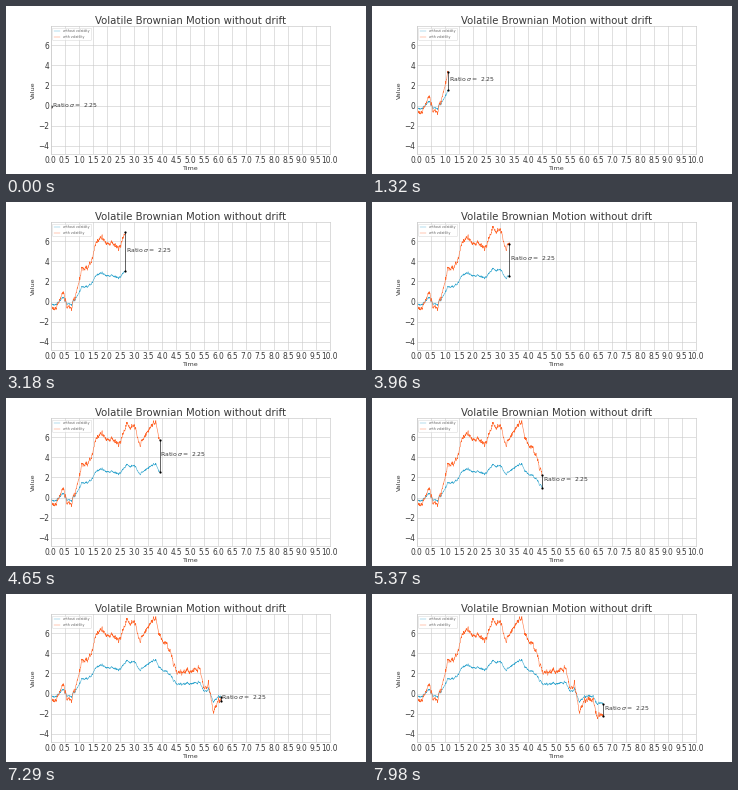
These frames come from a looping animation (360x168 px, 8000 ms). A matplotlib script:

```python
import numpy as np
import matplotlib.pyplot as plt
from matplotlib.animation import FuncAnimation

FRAMES, LOOP_MS = 267, 8000
DT = 0.025          # time covered by one frame
SUB = 4             # path points per frame
SIGMA = 2.25
INK, SOFT, PALE = "#3a3a3a", "#666666", "#cccccc"
BLUE, ORANGE = "#2fa4cd", "#ff6428"

# Turning points of the volatile path: (time, value)
TURNS = [
    (0, -0.2), (0.1, -0.8), (0.2, -0.5), (0.45, 0.9), (0.6, -0.5),
    (0.75, -0.8), (0.9, 0.7), (1.12, 3.2), (1.4, 3.5), (1.65, 5.8),
    (1.8, 6.3), (2.1, 5.7), (2.5, 5.7), (2.75, 7.5), (3.05, 6.8),
    (3.2, 5), (3.4, 6.4), (3.75, 7.5), (3.9, 5.8), (4.25, 4.5),
    (4.5, 2.1), (5.35, 2.4), (5.5, 0.6), (5.65, 1.1),
    (5.83, -1.9), (6, -0.7), (6.3, -0.5), (6.45, -2), (6.7, -2.3),
]


def make_path(times):
    """Trend through the turning points plus mean-reverting noise."""
    rng = np.random.default_rng(4)
    trend = np.interp(times, *zip(*TURNS)) / SIGMA
    noise = np.zeros(len(times))
    for i in range(1, len(times)):
        noise[i] = 0.8 * noise[i - 1] + rng.normal(0, 0.045)
    return np.clip(trend + noise, -2.1, 3.5)


times = np.arange(FRAMES * SUB + 1) * DT / SUB
plain = make_path(times)

plt.rcParams["font.family"] = "DejaVu Sans"
fig = plt.figure(figsize=(5, 7 / 3), dpi=72, facecolor="white")
ax = fig.add_axes([0.12425, 0.12, 0.775, 0.76])
ax.set(xlim=(0, 10), ylim=(-4.805, 7.9))
ax.set_xticks(np.arange(0, 10.1, 0.5))
ax.xaxis.set_major_formatter("{x:.1f}")
ax.set_yticks(range(-4, 7, 2))
ax.tick_params(length=0, pad=1.75, labelsize=7.5, labelcolor=INK)
ax.set_axisbelow(True)
ax.grid(color=PALE, lw=0.6)
for spine in ax.spines.values():
    spine.set(color=PALE, linewidth=0.7)
ax.set_title("Volatile Brownian Motion without drift",
             fontsize=10.07, color=INK, pad=2.6)
ax.set_xlabel("Time", fontsize=6.4, color=INK, labelpad=1.6)
ax.set_ylabel("Value", fontsize=6.4, color=INK, labelpad=1.6)

low_line, = ax.plot([], [], color=BLUE, lw=0.5, label="without volatility")
high_line, = ax.plot([], [], color=ORANGE, lw=0.5, label="with volatility")
gap, = ax.plot([], [], "o-", color="black", lw=0.6, ms=2.2, mew=0)
note = ax.text(0, 0, rf"Ratio $\sigma = $ {SIGMA}", fontsize=6.15, color=INK)
legend = ax.legend(loc="upper left", fontsize=3.3, labelcolor=SOFT,
                   edgecolor=PALE)
legend.get_frame().set_linewidth(0.5)
plt.setp(legend.get_lines(), linewidth=0.35)


def draw(i):
    end = (i + 1) * SUB
    t, low = times[end], plain[end]
    low_line.set_data(times[:end + 1], plain[:end + 1])
    high_line.set_data(times[:end + 1], SIGMA * plain[:end + 1])
    gap.set_data([t, t], [low, SIGMA * low])
    note.set_position((t + 0.02, (1 + SIGMA) * low / 2))
    return low_line, high_line, gap, note


anim = FuncAnimation(fig, draw, frames=FRAMES, interval=LOOP_MS / FRAMES,
                     init_func=lambda: draw(0), repeat=True, repeat_delay=0)
plt.show()
```
